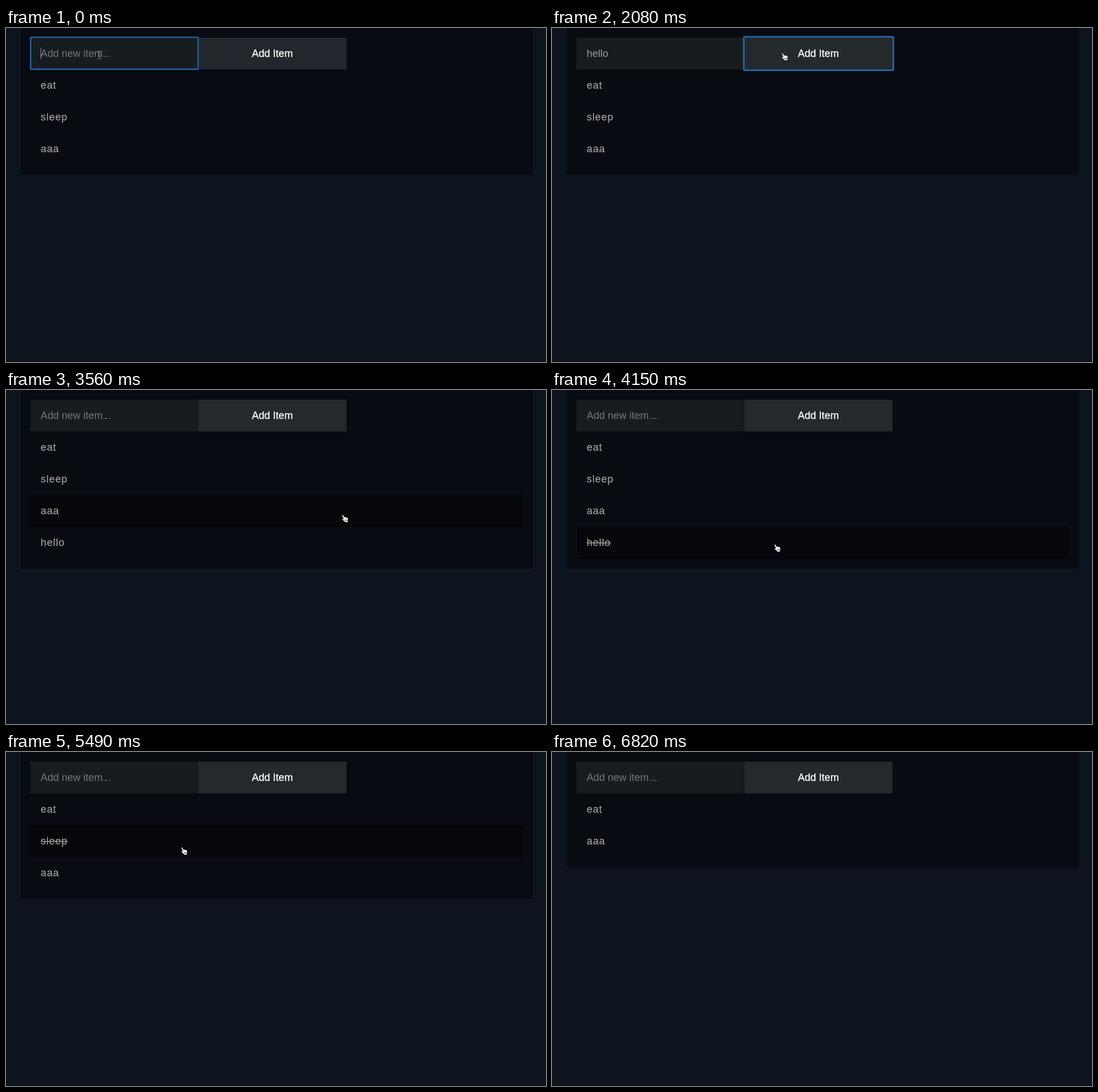
An HTML page that plays this animation: 950x589 px, repeating every 7630 ms.

```html
<!DOCTYPE html>
<html lang="en">
<head>
<meta charset="utf-8">
<title>Item list</title>
<style>
html, body { margin: 0; width: 100%; height: 100%; overflow: hidden; background: #0d141d; }
svg { display: block; }
text { font: 18px "Liberation Sans", Arial, sans-serif; white-space: pre; }
.item { fill: #9b9b9b; stroke: #9b9b9b; stroke-width: .25; letter-spacing: .9px; }
.ring { fill: none; stroke: #2462a2; }
</style>
</head>
<body>
<svg width="950" height="589" viewBox="0 0 950 589">
  <rect width="950" height="589" fill="#0d141d"/>
  <rect y="588" width="950" height="1" fill="#080c12"/>
  <rect id="panel" x="26" width="901" fill="#080b11"/>
  <rect id="hover" x="44" width="866" height="57" fill="#05070a"/>
  <rect x="43" y="17" width="296" height="56" fill="#171c21"/>
  <rect id="fieldRing" class="ring" x="43.3" y="16.4" width="294.7" height="56.4" rx="1" stroke-width="2.4"/>
  <rect id="button" x="339" y="17" width="260" height="56"/>
  <rect id="buttonRing" class="ring" x="337.5" y="15.5" width="263" height="59" rx="2" stroke-width="3"/>
  <text id="field" x="61" y="51"></text>
  <rect id="caret" y="35" width="1" height="20" fill="#8f9294"/>
  <text x="432.6" y="51" fill="#fff" stroke="#fff" stroke-width=".3">Add Item</text>
  <g id="rows"></g>
  <rect id="strike" x="61" height="1.4" fill="#9b9b9b"/>
  <g id="beam" fill="none" stroke="#85888a" stroke-width="1">
    <path d="M-3.5-6.5H-1.5L.5-5L2.5-6.5H4.5M.5-5V6M-3.5 7.5H-1.5L.5 6L2.5 7.5H4.5M-1.5 2.5H2.5"/>
  </g>
  <g id="hand" stroke="#000" stroke-width=".8" stroke-linejoin="round">
    <path fill="#fff" transform="translate(-5.5-6.5)" d="M1 1.2C1.6.2 2.8.3 3.2 1.3L4.6 4.6C5.4 4 6.4 4.2 6.9 4.9C7.7 4.4 8.7 4.7 9.1 5.5C10 5.2 10.9 5.7 11.2 6.8C11.8 9 11.5 10.5 11 12.5V13.8H5.6C5 12 3 10.8 1 9C.2 8 1 7 2.2 7.4L3.3 8.2L1 2.6Z"/>
    <path fill="none" d="M.6 2.5V5M2.5 2.5V5M4.3 2.5V5"/>
  </g>
  <path id="arrow" fill="#000" stroke="#fff" stroke-width="1" d="M-4-7V5L-1.2 2.4L.8 7L3 6L1 1.6H4.8Z"/>
</svg>
<script>
const LOOP = 7630, ROW = 56, TOP = 73;
const $ = id => document.getElementById(id);
const show = (el, on) => el.setAttribute('visibility', on ? 'visible' : 'hidden');
const set = (el, name, value) => el.setAttribute(name, value);

const keys = [450, 600, 740, 890, 1040];
const PRESS = 2080, ADD = 2820, STRIKE_1 = 4150, REMOVE_1 = 4750, STRIKE_2 = 5490, REMOVE_2 = 5940;

// time, x, y, pointer shape
const moves = [
  [0, 164, 47, 'beam'],
  [1640, 236, 28, 'beam'],
  [1790, 345, 15, 'arrow'],
  [1930, 402, 38, 'hand'],
  [2080, 409, 50, 'hand'],
  [3120, 450, 71, 'hand'],
  [3270, 548, 114, 'hand'],
  [3420, 627, 172, 'hand'],
  [3560, 596, 226, 'hand'],
  [3710, 502, 260, 'hand'],
  [3860, 424, 275, 'hand'],
  [4010, 396, 278, 'hand'],
  [5050, 382, 248, 'hand'],
  [5200, 342, 202, 'hand'],
  [5340, 313, 174, 'hand'],
  [6090, 345, 193, 'hand'],
  [6240, 455, 262, 'arrow'],
  [6380, 590, 352, 'arrow'],
  [6530, 750, 462, 'arrow'],
  [6680, 914, 581, 'arrow'],
  [6820, 0, 0, '']
];

const rows = Array.from({ length: 4 }, () => {
  const row = document.createElementNS('http://www.w3.org/2000/svg', 'text');
  row.setAttribute('class', 'item');
  row.setAttribute('x', 61);
  return $('rows').appendChild(row);
});

function setText(el, value) {
  if (el.textContent !== value) el.textContent = value;
}

function listAt(t) {
  if (t < ADD) return ['eat', 'sleep', 'aaa'];
  if (t < REMOVE_1) return ['eat', 'sleep', 'aaa', 'hello'];
  return t < REMOVE_2 ? ['eat', 'sleep', 'aaa'] : ['eat', 'aaa'];
}

function drawField(t) {
  const typed = t < ADD ? 'hello'.slice(0, keys.filter(k => t >= k).length) : '';
  const field = $('field');
  setText(field, typed || 'Add new item...');
  set(field, 'fill', typed ? '#999b9c' : '#74787a');
  set($('caret'), 'x', 61 + (typed ? field.getComputedTextLength() : 0));
  show($('caret'), t < 300 || (t >= 450 && t < 1490));
  show($('fieldRing'), t < PRESS);
  show($('buttonRing'), t >= PRESS && t < ADD);
  set($('button'), 'fill', t < 1930 ? '#23272d' : '#24292c');
}

function drawList(list, t) {
  set($('panel'), 'height', TOP + list.length * ROW + 18);
  rows.forEach((row, i) => {
    setText(row, list[i] || '');
    set(row, 'y', 107 + i * ROW);
  });
  const done = t >= STRIKE_1 && t < REMOVE_1 ? 3 : t >= STRIKE_2 && t < REMOVE_2 ? 1 : -1;
  show($('strike'), done >= 0);
  if (done >= 0) {
    set($('strike'), 'y', 101.2 + ROW * done - ROW * 0 - .6 + .4);
    set($('strike'), 'width', rows[done].getComputedTextLength());
  }
}

function drawPointer(list, t) {
  const [, x, y, shape] = moves.filter(m => t >= m[0]).pop();
  for (const id of ['beam', 'hand', 'arrow']) {
    show($(id), id === shape);
    set($(id), 'transform', `translate(${x} ${y})`);
  }
  const over = Math.floor((y - 6 - TOP) / ROW);
  show($('hover'), shape && over >= 0 && over < list.length);
  set($('hover'), 'y', TOP + over * ROW);
}

function draw(t) {
  const list = listAt(t);
  drawField(t);
  drawList(list, t);
  drawPointer(list, t);
}

const start = performance.now();
function tick() {
  draw((performance.now() - start) % LOOP);
  requestAnimationFrame(tick);
}
tick();
</script>
</body>
</html>
```
